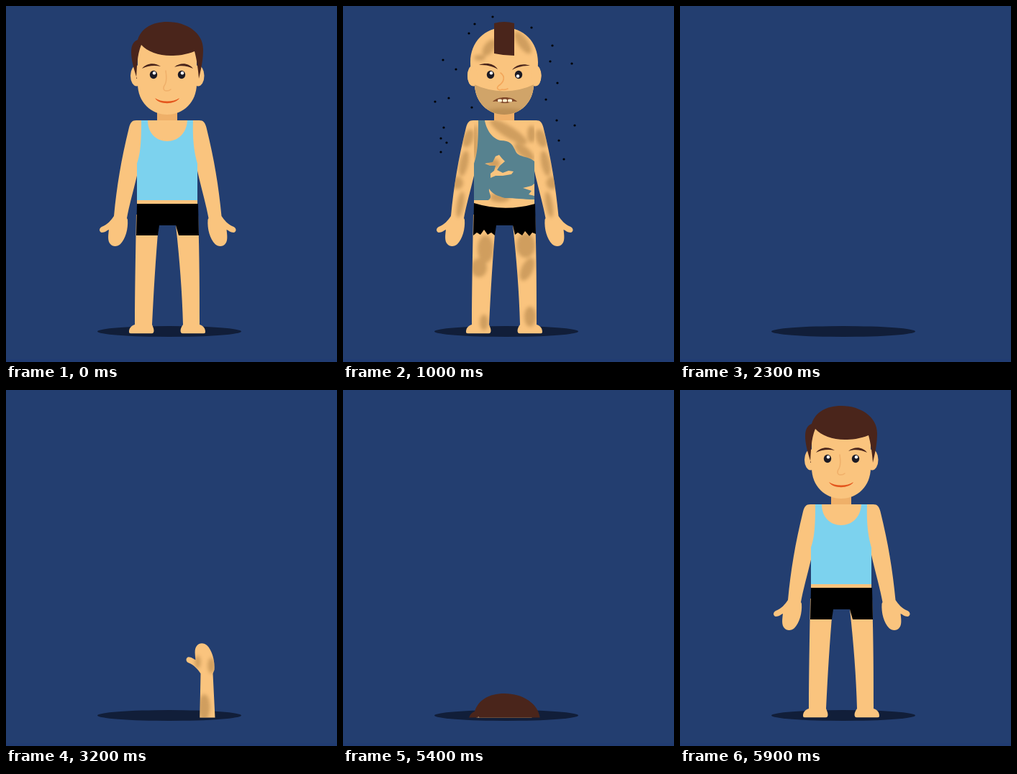
These frames come from a looping animation (460x495 px, 6.9 s). An HTML page:

```html
<!DOCTYPE html>
<html lang="en">
<head>
<meta charset="utf-8">
<title>Fall and return</title>
<style>
html, body { margin: 0; width: 100%; height: 100%; overflow: hidden; background: #233e70; }
svg { display: block; width: 100%; height: 100%; }
.skin { fill: #fac47e; }
.brown { fill: #4a251b; }
.smudge { fill: #a97c42; opacity: .52; filter: url(#soft); }
.eye { fill: #1b1a24; }
.glint { fill: #fff; }
.line { fill: none; stroke: #f0b06a; stroke-width: 1.6; stroke-linecap: round; stroke-linejoin: round; }
</style>
</head>
<body>
<svg viewBox="0 0 460 495" xmlns="http://www.w3.org/2000/svg">
<defs>
  <filter id="soft" x="-30%" y="-30%" width="160%" height="160%"><feGaussianBlur stdDeviation="2.6"/></filter>
  <path id="armShape" d="M190 159H181C175 159 173 162 171 169C160 214 154 250 150 292C146 298 141 304 133 307C129 309 129 314 133 315C138 315 140 312 143 311C142 319 141 327 145 331C148 335 155 335 159 331C166 324 170 310 169 297L168 295C171 278 177 257 182 236L190 200Z"/>
  <path id="handShape" d="M150 292C146 298 141 304 133 307C129 309 129 314 133 315C138 315 140 312 143 311C142 319 141 327 145 331C148 335 155 335 159 331C166 324 170 310 169 297L167 292L172 190H148Z"/>
  <path id="torsoShape" d="M182 159H266V290H182Z"/>
  <path id="legsShape" d="M181 290C180 350 179 400 179 443C173 445 171 449 171 453Q171 455.5 174 455.5H202Q205 455.5 205.500 452C205.500 448 204 446 203 443C205 400 208 350 212 305H236C241 350 245 400 246 443C244 446 242.500 448 242.500 452Q243 455.500 246 455.500H274Q277 455.500 277 453C277 449 275 445 269 443C269 400 269 350 267 290Z"/>
  <path id="skullShape" d="M177 78C177 50 197 30 224 30S271 50 271 78C271 90 269 98 265 108C265 134 246 151 224 151S183 134 183 108C179 98 177 90 177 78Z"/>
  <path id="jawShape" d="M183 70C183 45 200 36 224 36S265 45 265 70V108C265 134 246 151 224 151S183 134 183 108Z"/>
  <clipPath id="ground"><rect width="460" height="455.400"/></clipPath>
  <clipPath id="armClip"><use href="#armShape"/></clipPath>
  <clipPath id="handClip"><use href="#handShape"/></clipPath>
  <clipPath id="torsoClip"><use href="#torsoShape"/></clipPath>
  <clipPath id="legsClip"><use href="#legsShape"/></clipPath>
  <clipPath id="skullClip"><use href="#skullShape"/></clipPath>
  <g id="armDirt" clip-path="url(#armClip)">
    <g class="smudge">
      <ellipse cx="174" cy="184" rx="7" ry="13" transform="rotate(20 174 184)"/>
      <ellipse cx="168" cy="219" rx="6" ry="18" transform="rotate(12 168 219)"/>
      <ellipse cx="159" cy="246" rx="8" ry="9"/>
      <ellipse cx="163" cy="276" rx="5" ry="18" transform="rotate(10 163 276)"/>
    </g>
  </g>
</defs>
<rect width="460" height="495" fill="#233e70"/>
<rect y="491" width="460" height="4" fill="#213c72"/>
<ellipse cx="227" cy="452.500" rx="100" ry="7.500" fill="#111e39"/>

<g clip-path="url(#ground)">
  <g id="hand">
    <g transform="translate(120.500 666) scale(1 -1)">
      <use href="#handShape" class="skin"/>
      <g clip-path="url(#handClip)"><g class="smudge">
        <ellipse cx="165" cy="303" rx="5" ry="11"/>
        <ellipse cx="146" cy="308" rx="4" ry="9"/>
        <ellipse cx="155" cy="245" rx="8" ry="18"/>
      </g></g>
    </g>
  </g>

  <g id="body">
    <use href="#legsShape" class="skin"/>
    <g class="dirty" clip-path="url(#legsClip)"><g class="smudge">
      <ellipse cx="198" cy="338" rx="11" ry="19"/>
      <ellipse cx="189" cy="364" rx="11" ry="13"/>
      <ellipse cx="196" cy="440" rx="6" ry="11"/>
      <ellipse cx="254" cy="333" rx="13" ry="17"/>
      <ellipse cx="256" cy="366" rx="8" ry="17" transform="rotate(25 256 366)"/>
      <ellipse cx="260" cy="432" rx="8" ry="14"/>
    </g></g>

    <g id="armL"><use href="#armShape" class="skin"/><use href="#armDirt" class="dirty"/></g>
    <g transform="translate(449.500 0) scale(-1 1)">
      <g id="armR"><use href="#armShape" class="skin"/><use href="#armDirt" class="dirty"/></g>
    </g>
    <rect x="210" y="145" width="28" height="16" fill="#efb069"/>
    <use href="#torsoShape" class="skin"/>

    <g class="clean">
      <path fill="#7cd2ee" d="M188 159H197C197 177 209 188 224 188S251 177 252 159H260C259 188 262 205 266 219V270H182V219C187 205 188 188 188 159Z"/>
      <path d="M182 275H267L268 319H240L236 305H213L211 319H181Z"/>
    </g>

    <g class="dirty">
      <g clip-path="url(#torsoClip)"><g class="smudge">
        <ellipse cx="230" cy="175" rx="30" ry="8" transform="rotate(32 230 175)"/>
        <ellipse cx="252" cy="203" rx="17" ry="7" transform="rotate(40 252 203)"/>
        <ellipse cx="262" cy="178" rx="6" ry="12"/>
        <ellipse cx="209" cy="219" rx="9" ry="7"/>
        <ellipse cx="184" cy="190" rx="4" ry="25"/>
        <ellipse cx="218" cy="266" rx="14" ry="7"/>
      </g></g>
      <path fill="#57828f" fill-rule="evenodd" d="M188 159H197C199 172 208 185 219 187C232 187 235 192 239 200C243 212 256 207 266 216V247L262 250L250 253L262 257L258 262L266 264V269C250 269 240 267 225 267C215 264 208 262 203 254C202 261 209 265 202 270H182V219C187 205 188 188 188 159ZM197 219L208 217L212 209L217 207L221 212L225 216L218 222L214 228L222 232L230 229L237 230L234 234L222 236L212 236L205 239V233L210 229L212 222L204 222Z"/>
      <path d="M182 274Q224 287 267 275L268 317L263 315L259 320L253 313L249 319L243 315L239 318L236 305H213L211 319L206 315L201 318L196 311L191 318L186 315L181 319Z"/>
    </g>

    <ellipse cx="181.500" cy="97" rx="8.500" ry="14.500" class="skin"/>
    <ellipse cx="267" cy="97" rx="8.500" ry="14.500" class="skin"/>
    <use href="#jawShape" class="skin"/>

    <g class="clean">
      <path class="line" d="M222 90C223 97 224 104 221 109C218 113 218 118 223 118Q227 118 229 116"/>
      <path class="brown" d="M182 101C178 88 174 76 174 64C174 55 177 49 183 47C188 31 203 22 224 22C252 22 274 38 274 60C274 76 271 88 268 101C267 88 265 74 262 63C250 68 238 69 229 69C212 69 196 63 188 54C182 68 182 86 181 101ZM189 87C195 79 207 78 215 84C206 82 197 83 189 87ZM260 87C254 79 242 78 234 85C242 82 252 83 260 87Z"/>
      <path fill="#e4561d" d="M207 128C216 134 232 134 241 128C236 137 213 138 207 128Z"/>
    </g>

    <g class="dirty">
      <use href="#skullShape" class="skin"/>
      <g clip-path="url(#skullClip)">
        <g class="smudge">
          <ellipse cx="203" cy="58" rx="7" ry="13" transform="rotate(35 203 58)"/>
          <ellipse cx="190" cy="72" rx="8" ry="4"/>
          <ellipse cx="250" cy="51" rx="7" ry="18" transform="rotate(-35 250 51)"/>
        </g>
        <path fill="#d0a469" d="M180 108Q224 129 268 108V155H180Z"/>
        <ellipse cx="224" cy="150" rx="30" ry="8" class="smudge"/>
      </g>
      <ellipse cx="180" cy="97" rx="7" ry="14" class="skin"/>
      <ellipse cx="268.500" cy="97" rx="7" ry="14" class="skin"/>
      <path class="brown" d="M210 24Q224 20 238 24V69Q224 69 210 66ZM189 82C199 78 210 80 215 88C207 83 199 82 189 82ZM260 83C250 79 240 82 235 89C243 84 251 83 260 83Z"/>
      <path class="line" style="stroke:#f3a65a" d="M219 93C226 98 224 106 216 111C212 115 217 118 221 116Q225 117 229 115"/>
      <path fill="#7d4527" d="M208 133C215 125 235 125 242 133C235 131 233 135 225 135S215 131 208 133Z"/>
      <g fill="#fff0cf">
        <rect x="215" y="129.500" width="6" height="4" rx="1.500"/>
        <rect x="222" y="129.500" width="6" height="4" rx="1.500"/>
        <rect x="229" y="129.500" width="6" height="4" rx="1.500"/>
      </g>
    </g>

    <ellipse cx="205" cy="95.500" rx="5.200" ry="5.800" class="eye"/>
    <ellipse cx="244" cy="95.500" rx="5.200" ry="5.800" class="eye"/>
    <circle id="glintL" r="2.200" class="glint"/>
    <circle id="glintR" r="2.200" class="glint"/>
  </g>
</g>
<g id="flies"></g>
</svg>
<script>
const LOOP = 6900, STEP = 100;
const $ = id => document.getElementById(id);
const all = sel => [...document.querySelectorAll(sel)];
const set = (el, attrs) => { for (const k in attrs) el.setAttribute(k, attrs[k]); };

// two resting spots for every fly
const spots = [
  [208,15,211,10], [183,25,187,29], [175,38,170,39], [262,30,267,31], [291,55,297,57],
  [139,75,140,79], [157,88,160,84], [288,77,288,81], [318,80,314,79], [298,107,302,112],
  [128,133,125,133], [147,128,151,125], [179,141,175,145], [282,130,290,132],
  [297,159,290,157], [322,166,325,172], [140,169,145,170], [136,184,133,182],
  [144,190,147,193], [136,203,130,204], [300,187,295,184], [307,213,309,207]
];
const flies = spots.map(() => {
  const c = document.createElementNS('http://www.w3.org/2000/svg', 'circle');
  set(c, { r: 1.6 });
  return $('flies').appendChild(c);
});
const clean = all('.clean'), dirty = all('.dirty');

function bodyDrop(k) {
  if (k < 18) return 0;
  if (k < 24) return 80 * (k - 17);
  if (k < 54) return 480;
  return Math.max(0, 80 * (59 - k));
}

function handDrop(k) {
  if (k < 28 || k > 43) return 170;
  if (k === 43) return 81;
  return Math.max(0, 122 * (33 - k) / 6);
}

function draw(k) {
  const falling = k >= 18 && k < 24;
  const grime = k < 24 ? Math.min(1, k / 6) : 0;
  const swapped = falling || (k >= 8 && k < 18 && k % 4 < 2);

  clean.forEach(el => set(el, { opacity: 1 - grime }));
  dirty.forEach(el => set(el, { opacity: grime }));

  const drop = bodyDrop(k);
  set($('body'), { transform: `translate(0 ${drop})`, visibility: drop < 480 ? 'visible' : 'hidden' });
  const lift = falling ? Math.min(1, (k - 17) / 2) : 0;
  const turn = `rotate(${83.5 * lift} 180 170)`;
  set($('armL'), { transform: `translate(0 ${-2 * lift}) ${turn}` });
  set($('armR'), { transform: `translate(${5 * lift} ${-2 * lift}) ${turn}` });

  const rolling = grime > 0.5;
  set($('glintL'), { cx: swapped ? 204 : 206, cy: swapped ? 97.5 : 93.3 });
  set($('glintR'), { cx: rolling && !swapped ? 243 : 245, cy: rolling && !swapped ? 97.5 : 93.3 });

  const up = handDrop(k);
  set($('hand'), { transform: `translate(0 ${up})`, visibility: up < 170 ? 'visible' : 'hidden' });

  set($('flies'), { opacity: falling ? 1 - (k - 17) / 6 : grime });
  const at = swapped ? 2 : 0;
  flies.forEach((f, i) => set(f, { cx: spots[i][at], cy: spots[i][at + 1] }));
}

const start = performance.now();
let last = -1;
function tick(now) {
  const k = Math.floor((Math.max(0, now - start) % LOOP) / STEP);
  if (k !== last) draw(last = k);
  requestAnimationFrame(tick);
}
draw(0);
requestAnimationFrame(tick);
</script>
</body>
</html>
```
